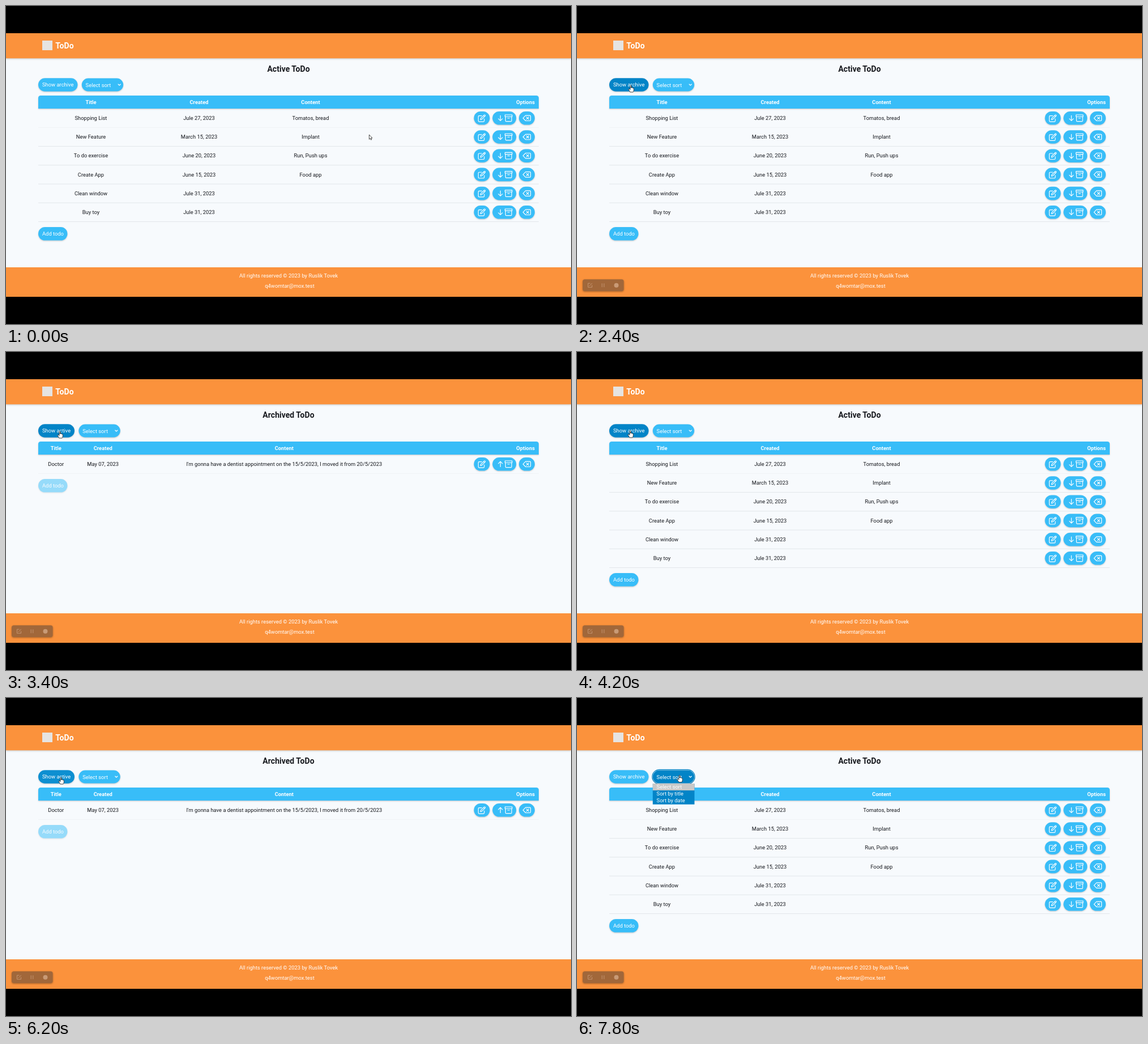
Recreate the animation shown at these times as an HTML page. Size 998 px wide and 561 px high, loop 8000 ms.

```html
<!DOCTYPE html>
<html lang="en">
<head>
<meta charset="utf-8">
<title>ToDo</title>
<style>
  html, body { margin: 0; width: 100%; height: 100%; overflow: hidden; background: #000; }
  svg { display: block; width: 100%; height: 100%; }
  text { font: 9.38px Roboto, sans-serif; fill: #fff; }
  .dark { fill: #16181d; }
  .mid { text-anchor: middle; }
  .bold { font-weight: 700; }
  .big { font-size: 14.06px; font-weight: 700; }
  .pill { fill: #38bdf8; filter: drop-shadow(0 1.5px 1.3px #0003); }
  .icon { fill: none; stroke: #fff; stroke-width: 1.15; stroke-linecap: round; stroke-linejoin: round; }
  .bar .icon { stroke: #c99a76; stroke-width: .9; }
  .cursor { fill: #fff; stroke: #222; stroke-width: .8; stroke-linejoin: round; }
</style>
</head>
<body>
<svg id="stage" viewBox="0 0 998 561" preserveAspectRatio="none"></svg>
<script>
const LIGHT = [56, 189, 248], DARK = [2, 132, 199];
const ROW_STEP = 33.2;

const label = (x, y, text, cls = '', id = '') =>
  `<text x="${x}" y="${y}" class="${cls}" id="${id}">${text}</text>`;
const pill = (x, y, w, h = 23.6, id = '') =>
  `<rect x="${x}" y="${y}" width="${w}" height="${h}" rx="${h / 2}" class="pill" id="${id}"/>`;
const icon = (x, y, d) => `<path class="icon" transform="translate(${x} ${y})" d="${d}"/>`;

// Icon paths are centred on 0,0.
const EDIT = 'M0-4.5H-4.5Q-6-4.5-6-3V4.5Q-6 6-4.5 6H3Q4.5 6 4.5 4.5V1M-2.2 2.4l.6-2.4L4.1-5.7q.9-.8 1.8 0t0 1.8L.2 1.8zM3.2-4.8l1.8 1.8';
const ARCHIVE = 'M-6.2-5.8H6.2V-2.6H-6.2zM-5.4-2.6V4.6Q-5.4 5.8-4.2 5.8H4.2Q5.4 5.8 5.4 4.6V-2.6M-1.6.2H1.6';
const BACKSPACE = 'M-6.8 0l4.6-4.7H5.4Q6.6-4.7 6.6-3.5V3.5Q6.6 4.7 5.4 4.7H-2.2zM-.6-2l4 4M3.4-2l-4 4';
const DOWN = 'M0-4.6V4.6M-3.6 1L0 4.6 3.6 1';
const UP = 'M0 4.6V-4.6M-3.6-1L0-4.6 3.6-1';

function table(columns, rows, arrow) {
  const heads = ['Title', 'Created', 'Content']
    .map((name, i) => label(columns[i], 172.8, name, 'mid bold')).join('');
  const body = rows.map((cells, i) => {
    const y = 197.8 + i * ROW_STEP;
    return cells.map((cell, c) => label(columns[c], y + 3.1, cell, 'mid dark')).join('') +
      `<path d="M57 ${y + 16.6}H941" stroke="#e2e6ea" opacity="${i ? 1 : .4}"/>` +
      pill(826.5, y - 11.8, 28) + icon(840.3, y + .3, EDIT) +
      pill(859.3, y - 11.8, 42) + icon(873.3, y, arrow) + icon(887.7, y, ARCHIVE) +
      pill(906, y - 11.8, 28) + icon(920, y, BACKSPACE);
  }).join('');
  return heads + body;
}

const activeRows = [
  ['Shopping List', 'Jule 27, 2023', 'Tomatos, bread'],
  ['New Feature', 'March 15, 2023', 'Implant'],
  ['To do exercise', 'June 20, 2023', 'Run, Push ups'],
  ['Create App', 'June 15, 2023', 'Food app'],
  ['Clean window', 'Jule 31, 2023', ''],
  ['Buy toy', 'Jule 31, 2023', '']
];
const archivedRows = [
  ['Doctor', 'May 07, 2023', "I'm gonna have a dentist appointment on the 15/5/2023, I moved it from 20/5/2023"]
];

document.getElementById('stage').innerHTML = `
  <rect width="998" height="561"/>
  <rect y="48" width="998" height="465" fill="#f7fafd"/>
  <rect y="48" width="998" height="44.3" fill="#fb923c" style="filter:drop-shadow(0 1.5px 1.5px #0003)"/>
  <rect y="461" width="998" height="52" fill="#fb923c"/>
  <rect width="998" height="48"/>
  <rect x="64" y="61" width="18" height="17" fill="#e6e4e2"/>
  ${label(87.3, 74.7, 'ToDo', 'big')}
  ${label(499, 116, '', 'big mid dark', 'heading')}
  ${pill(57, 127.2, 69.5, 23.6, 'toggle')}
  ${label(64, 142.3, '', '', 'toggleText')}
  <path d="M57 181V162.5Q57 158 61.5 158H936.5Q941 158 941 162.5V181z" class="pill"/>
  ${label(934, 172.8, 'Options', 'bold', 'options')}
  <g id="active">${table([150, 341, 538], activeRows, DOWN)}</g>
  <g id="archived">${table([88.3, 171.2, 491.3], archivedRows, UP)}</g>
  <g id="select">
    <rect id="ring" x="-1" y="126.4" width="75.4" height="25.2" rx="12.6" fill="#fff" stroke="#0284c7" stroke-width="1.2"/>
    ${pill(0, 127.6, 73.4, 22.8, 'selectPill')}
    ${label(6.8, 142.5, 'Select sort')}
    <path d="M64.4 138l2.1 2 2.1-2" class="icon"/>
    <g id="menu">
      <rect y="151" width="73.7" height="36.7" fill="#0284c7"/>
      <rect y="151" width="73.7" height="12" fill="#c8c8c8"/>
      ${['Select sort', 'Sort by title', 'Sort by date'].map((s, i) => label(6.8, 160.3 + 12 * i, s)).join('')}
    </g>
  </g>
  <g id="add">${pill(57, 390, 51.5)}${label(64, 405, 'Add todo')}</g>
  ${label(412, 478.7, 'All rights reserved © 2023 by Ruslik Tovek')}
  ${label(501, 497.3, 'q4womtar@mox.test', 'mid')}
  <g id="bar" class="bar">
    <rect x="10" y="482.3" width="72.6" height="20.6" rx="4" fill="#a1673a" style="filter:drop-shadow(0 1px 1.5px #0005)"/>
    ${icon(23, 492.7, 'M0-3.5H-3.5V3.5H3.5V0M-1 1L3.5-3.5')}
    ${icon(46, 492.7, 'M-1.8-3V3M1.8-3V3')}
    <circle cx="69.5" cy="492.7" r="4" fill="#c99a76"/>
  </g>
  <path id="arrow" class="cursor" d="M0 0V8.2L1.9 6.5 3.1 9.2 4.4 8.6 3.2 6H5.6z"/>
  <path id="hand" class="cursor" d="M-1 1Q0-.8 1 1V4.6Q2-.0 0 4.6 2.2 3.7 2.5 5 3.7 4.2 4 5.5 5.3 5 5.3 6.6V9Q5.2 11 4 12.4H-1.2Q-2 10.6-3.6 8.4-4.4 6.8-3 6.6-1.8 6.8-1 8z"/>
`;
document.getElementById('options').style.textAnchor = 'end';

const el = Object.fromEntries([...document.querySelectorAll('[id]')].map(e => [e.id, e]));

// Each track is a list of [time, ...values], interpolated linearly.
const cursorTrack = [
  [1600, 641.5, 227], [1800, 560, 214], [2000, 330, 178], [2200, 140, 148], [2400, 95, 139.5],
  [3400, 95, 139.5], [3800, 94, 138.5], [4800, 94, 138.5], [5000, 88, 158], [5200, 79.5, 182],
  [5800, 82, 184], [6000, 89, 165], [6200, 97, 139.5], [6600, 97, 139.5], [6800, 128, 138], [7000, 181, 136]
];
const toggleTrack = [[2200, 0], [2400, 1], [5200, 1], [5400, 0], [6000, 0], [6200, .8], [6400, 1], [6600, 1], [6800, .4], [7000, 0]];
const selectTrack = [[6800, 0], [7000, .6], [7200, 1]];
const addTrack = [[2600, 1], [2800, .65], [3000, .5], [3600, .5], [3800, 1], [4800, 1], [5000, .6], [5200, .5], [6400, .5], [6600, 1]];

function sample(track, t) {
  const next = track.findIndex(key => key[0] > t);
  if (next === 0) return track[0].slice(1);
  if (next < 0) return track.at(-1).slice(1);
  const a = track[next - 1], b = track[next];
  const k = (t - a[0]) / (b[0] - a[0]);
  return a.slice(1).map((v, i) => v + (b[i + 1] - v) * k);
}
const hoverColor = k => `rgb(${LIGHT.map((v, i) => v + (DARK[i] - v) * k)})`;
const show = (node, on) => node.style.display = on ? '' : 'none';
const within = (t, from, to) => t >= from && t < to;

function draw(t) {
  const archived = within(t, 2600, 3800) || within(t, 4800, 6600);
  show(el.active, !archived);
  show(el.archived, archived);
  el.heading.textContent = archived ? 'Archived ToDo' : 'Active ToDo';
  el.toggleText.textContent = archived ? 'Show active' : 'Show archive';
  el.toggle.setAttribute('width', archived ? 64 : 69.5);
  el.toggle.style.fill = hoverColor(sample(toggleTrack, t)[0]);
  el.select.setAttribute('transform', `translate(${archived ? 128.4 : 133.8} 0)`);
  el.selectPill.style.fill = hoverColor(sample(selectTrack, t)[0]);
  el.add.setAttribute('transform', `translate(0 ${archived ? -5 * ROW_STEP : 0})`);
  el.add.setAttribute('opacity', sample(addTrack, t)[0]);
  show(el.ring, t >= 7600);
  show(el.menu, t >= 7600);
  show(el.bar, t >= 200);

  const pointing = within(t, 2400, 5000) || within(t, 6200, 6800) || t >= 7000;
  show(el.hand, pointing);
  show(el.arrow, !pointing);
  (pointing ? el.hand : el.arrow).setAttribute('transform', `translate(${sample(cursorTrack, t)})`);
}

const start = performance.now();
function tick() {
  const t = (performance.now() - start) % 8000;
  draw(Math.floor(t / 200) * 200);
  requestAnimationFrame(tick);
}
tick();
</script>
</body>
</html>
```
